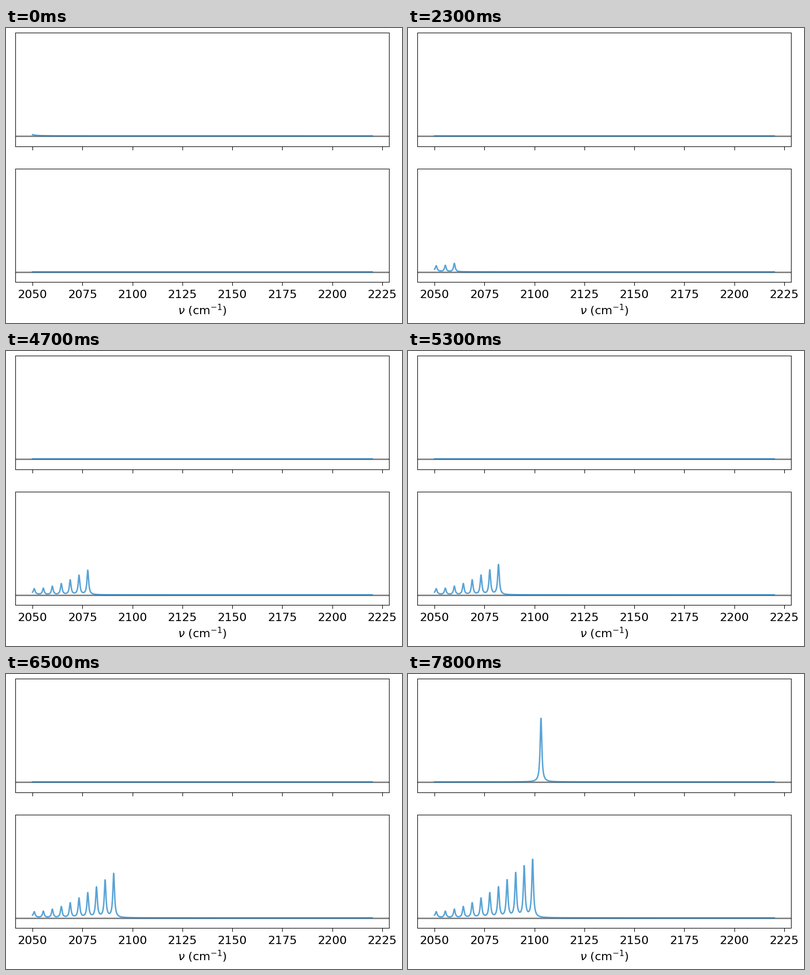
Animation, 763 px wide and 568 px high, one loop 8 s. Source, as a matplotlib script:

```python
import numpy as np
import matplotlib.pyplot as plt
from matplotlib.animation import FuncAnimation

W, H, DPI = 763, 568, 100
LEFT, TOP = 18.4, 9.4              # corner of the upper panel, px
PANEL_W, PANEL_H = 720, 480 / 2.2
BLUE = "#0273c0"
GAMMA = 0.5      # half width of a line, cm^-1
HOLD = 6         # frames per line; the last one clears the upper panel

plt.rcParams.update({"font.family": "DejaVu Sans", "font.size": 16})

# P-branch lines from J = 23 down to 10
J = np.arange(23, 9, -1)
centers = 2143.271 - 3.827555 * J - 0.017503 * J**2 + 2.448e-5 * J**3
heights = [0.70, 0.051, 0.061, 0.081, 0.106, 0.142, 0.187,
           0.237, 0.292, 0.358, 0.429, 0.494, 0.560, 0.620]

nu = np.linspace(2050, 2220, 2000)
lines = np.array([h * GAMMA**2 / ((nu - c)**2 + GAMMA**2)
                  for c, h in zip(centers, heights)])
sums = np.vstack([np.zeros_like(nu), np.cumsum(lines, axis=0)])

fig = plt.figure(figsize=(W / DPI, H / DPI), dpi=DPI, facecolor="white")


def add_panel(top):
    """Axes hanging from a pixel row, with a baseline and an empty spectrum."""
    ax = fig.add_axes([LEFT / W, 1 - (top + PANEL_H) / H,
                       PANEL_W / W, PANEL_H / H])
    ax.axhline(0, color="black", alpha=0.5, lw=2)
    curve, = ax.plot(nu, sums[0], color=BLUE, alpha=0.65, lw=2)
    ax.set_xlim(2041.5, 2228.5)
    ax.set_ylim(-0.1, 1)
    ax.set_xticks(np.arange(2050, 2226, 25))
    ax.set_yticks([])
    ax.tick_params(axis="x", length=5, pad=5.35)
    return ax, curve


upper, single = add_panel(TOP)
lower, total = add_panel(TOP + 1.2 * PANEL_H)
upper.tick_params(labelbottom=False)
lower.set_xlabel(r"$\nu$ (cm$^{-1}$)")


def update(i):
    done = (i + 1) // HOLD
    clear = i % HOLD == HOLD - 1
    single.set_ydata(sums[0] if clear else lines[done])
    total.set_ydata(sums[done])
    return single, total


anim = FuncAnimation(fig, update, frames=80, interval=100, repeat=True,
                     repeat_delay=0, blit=False)
plt.show()
```
